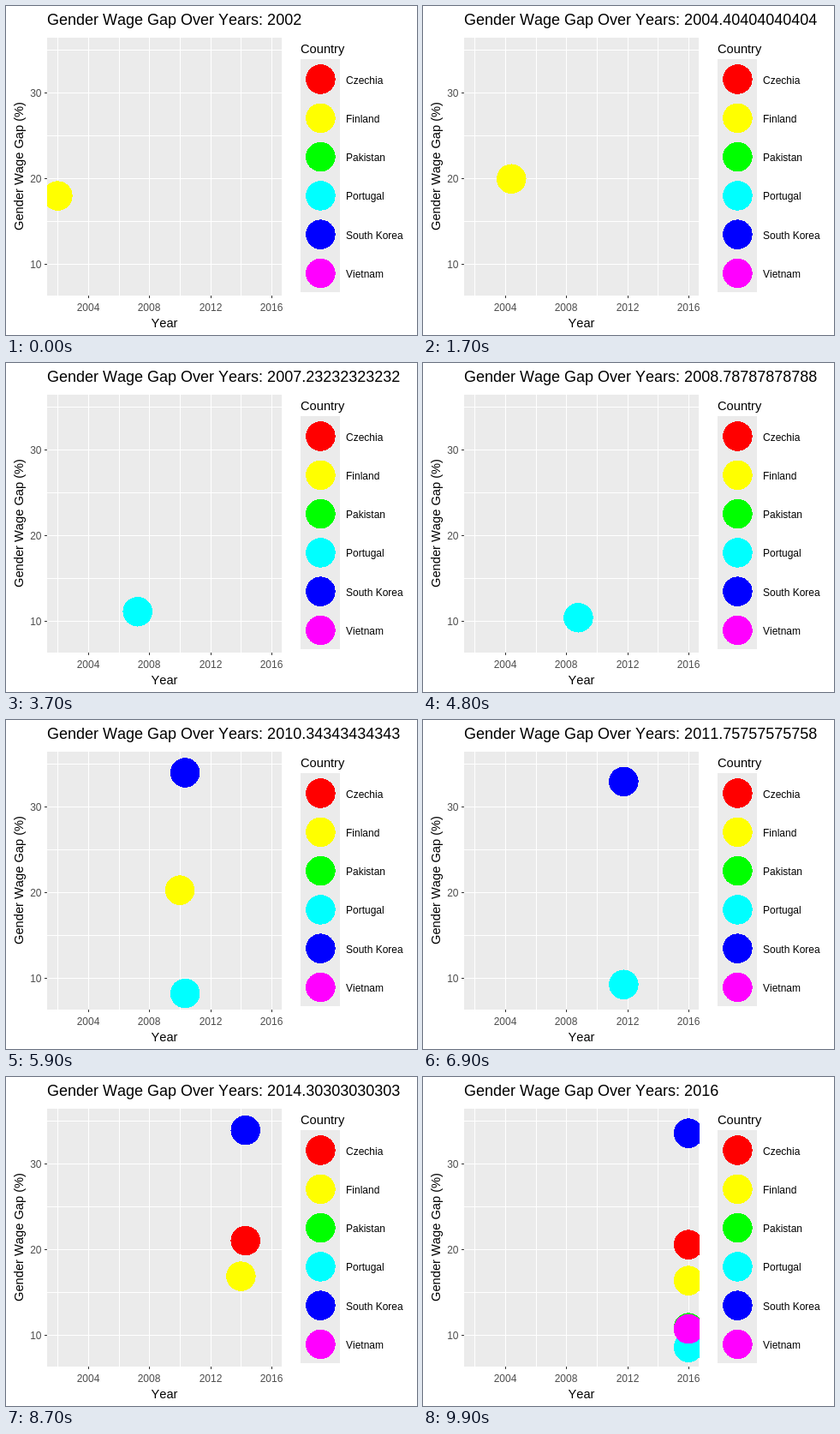
Write an HTML page that moves like this. It is 480x384 px and loops after 10000 ms.

```html
<!DOCTYPE html>
<html lang="en">
<head>
<meta charset="utf-8">
<title>Gender Wage Gap Over Years</title>
<style>
  html, body { margin: 0; width: 100%; height: 100%; overflow: hidden; background: #fff; }
  svg { display: block; width: 480px; height: 384px; }
  text { font-family: "Liberation Sans", Arial, sans-serif; font-size: 12px; font-kerning: none; }
  .title { font-size: 18px; }
  .label { font-size: 14.67px; }
  .tick { fill: #4d4d4d; }
  .mid { text-anchor: middle; }
  .end { text-anchor: end; }
  rect, circle { shape-rendering: crispEdges; }
</style>
</head>
<body>
<svg viewBox="0 0 480 384">
  <clipPath id="panel"><rect x="48" y="37" width="275" height="302"/></clipPath>
  <rect x="48" y="37" width="274" height="301" fill="#ebebeb"/>
  <rect x="344" y="62" width="46" height="272" fill="#ebebeb"/>
  <g id="axes"></g>
  <g id="dots" clip-path="url(#panel)"></g>
  <g id="legend"></g>
  <text id="title" class="title" x="48" y="22"></text>
  <text class="label mid" x="185" y="375">Year</text>
  <text class="label mid" transform="translate(20 187) rotate(-90)">Gender Wage Gap (%)</text>
  <text class="label" x="344" y="55">Country</text>
</svg>
<script>
const FRAMES = 100, STEP = 100, FIRST = 2002, LAST = 2016, RADIUS = 17.3;

const $ = id => document.getElementById(id);
const xOf = year => 60.4 + 17.83 * (year - FIRST);
const yOf = gap => 401.6 - 10 * gap;
const frameOf = year => Math.round((FRAMES - 1) * (year - FIRST) / (LAST - FIRST));

// A run is a stretch of reported years, with its gap as a function of the year.
const run = (from, to, gap) => ({ from, to, gap });
const line = (from, a, to, b) => run(from, to, year => a + (b - a) * (year - from) / (to - from));
const single = (year, gap) => run(year, year, () => gap);

const countries = [
  { name: "Czechia", runs: [line(2013, 21.4, LAST, 20.6)] },
  { name: "Finland", runs: [line(2002, 18, 2006, 21.3), single(2010, 20.3), single(2014, 16.9), single(LAST, 16.4)] },
  { name: "Pakistan", runs: [single(LAST, 10.9)] },
  { name: "Portugal", runs: [
    run(2007, 2013, year => 8 + Math.max(1.3 * (2010 - year), 0.73 * (year - 2010)) * (year < 2008 ? 0.8 : 1)),
    line(2015, 7.8, LAST, 8.6)] },
  { name: "South Korea", runs: [run(2009, LAST, year => 33.5 + 0.75 * Math.cos((year - 2010) * 1.55))] },
  { name: "Vietnam", runs: [single(LAST, 10.75)] }
];

// South Korea falls to a low in 2012, then settles back in a shallow arc.
countries[4].runs[0].gap = year => year < 2012
  ? 32.8 + 0.73 * (2012 - year)
  : 34.1 - 0.325 * Math.abs(year - 2014) ** (year < 2014 ? 2 : 0.62);

// Portugal dips steeply to 2010, then climbs slowly.
countries[3].runs[0].gap = year => year < 2010
  ? 8 + 3.3 * Math.sin((2010 - year) * Math.PI / 4.6)
  : 8 + 0.73 * (year - 2010);

countries.forEach((c, i) => c.color = `hsl(${i * 60} 100% 50%)`);

function add(parent, tag, attrs, text = "") {
  const el = document.createElementNS("http://www.w3.org/2000/svg", tag);
  for (const key in attrs) el.setAttribute(key, attrs[key]);
  el.textContent = text;
  return parent.appendChild(el);
}

function box(x, y, width, height, fill) {
  add($("axes"), "rect", { x, y, width, height, fill });
}

function drawAxes() {
  for (let gap = 10; gap <= 35; gap += 5) {
    const y = Math.floor(yOf(gap));
    box(48, y, 274, 1, "#fff");
    if (gap % 10) continue;
    box(45, y, 3, 1, "#333");
    add($("axes"), "text", { x: 41.5, y: y + 5, class: "tick end" }, gap);
  }
  for (let year = FIRST; year <= LAST; year += 2) {
    const x = Math.round(xOf(year));
    box(x, 37, 1, 301, "#fff");
    if (year % 4) continue;
    box(x, 338, 1, 3, "#333");
    add($("axes"), "text", { x, y: 356, class: "tick mid" }, year);
  }
}

function drawLegend() {
  countries.forEach(({ name, color }, i) => {
    const cy = 85.5 + 45.3 * i;
    add($("legend"), "circle", { cx: 367.4, cy, r: RADIUS, fill: color });
    add($("legend"), "text", { x: 397, y: Math.round(cy + 5) }, name);
  });
}

// A finished run rests on its last year until the next year begins.
function pointAt(runs, frame, now) {
  const current = runs.find(r => frame >= frameOf(r.from) && frame < frameOf(r.to + 1));
  if (!current) return null;
  const year = Math.min(Math.max(now, current.from), current.to);
  return { cx: xOf(year), cy: yOf(current.gap(year)) };
}

function render(frame) {
  const now = FIRST + (LAST - FIRST) * frame / (FRAMES - 1);
  $("title").textContent = "Gender Wage Gap Over Years: " + Number(now.toPrecision(15));
  for (const { dot, runs } of countries) {
    const point = pointAt(runs, frame, now);
    dot.setAttribute("visibility", point ? "visible" : "hidden");
    for (const key in point) dot.setAttribute(key, point[key]);
  }
}

drawAxes();
drawLegend();
for (const c of countries) c.dot = add($("dots"), "circle", { r: RADIUS, fill: c.color });

const begin = performance.now();
let shown = -1;
function tick() {
  const frame = Math.floor((performance.now() - begin) / STEP) % FRAMES;
  if (frame !== shown) render(shown = frame);
  requestAnimationFrame(tick);
}
tick();
</script>
</body>
</html>
```
